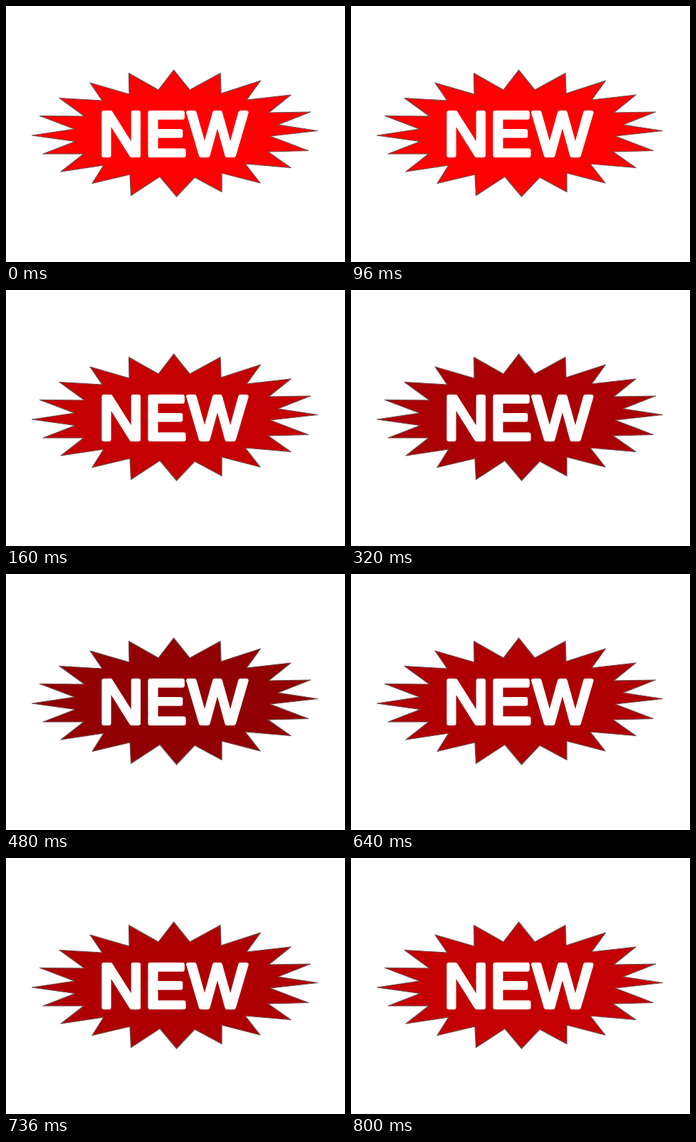
These frames come from a looping animation (476x360 px, 960 ms). An HTML page:

```html
<!DOCTYPE html>
<html lang="en">
<head>
<meta charset="utf-8">
<title>New</title>
<style>
  html, body { margin: 0; width: 100%; height: 100%; overflow: hidden; background: #fff; }
  svg { display: block; width: 100%; height: 100%; }
  #burst { stroke: #705050; stroke-width: 1.2; stroke-linejoin: round; }
  text {
    font: 87px "Liberation Sans", Arial, sans-serif;
    fill: #fff; stroke: #fff; stroke-width: 6; stroke-linejoin: round;
  }
</style>
</head>
<body>
<svg viewBox="0 0 476 360">
  <polygon id="burst" points="
    235.5,90 258,118 301,94.5 302,123 357.5,105 338,132 400,125 369,150
    427.5,149 382,167 437.5,175.5 371,183 424.5,203.5 368,205 400,227.5 336,222
    357,249 303,235 303,261.5 265,241 239.5,268 216,240 175.5,266.5 174,237
    121,249.5 137,224 77,233 109,208 52,208 97,190.5 36.5,182 96,173
    47.5,154.5 110,155 75,129.5 135,133 118,108 173,124 172.5,94.5 214,118"/>
  <text x="130.3 195.2 255.7" y="210">NEW</text>
</svg>
<script>
  const STEP = 160;
  const shades = ["#fd0103", "#c40002", "#aa0003", "#910003", "#ae0003", "#c40002"];
  const burst = document.getElementById("burst");

  function draw(ms) {
    burst.setAttribute("fill", shades[Math.floor(ms / STEP) % shades.length]);
  }

  let start;
  function tick(now) {
    start ??= now;
    draw(Math.max(0, now - start));
    requestAnimationFrame(tick);
  }
  draw(0);
  requestAnimationFrame(tick);
</script>
</body>
</html>
```
